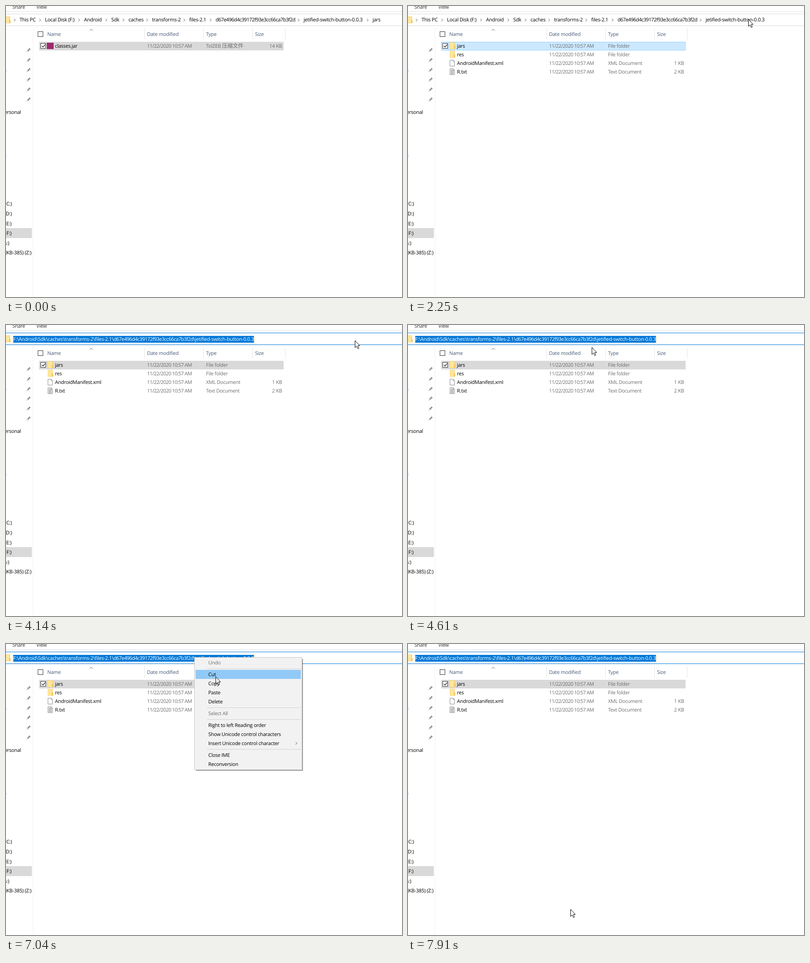
These frames come from a looping animation (873x642 px, 7.99 s). An HTML page:

```html
<!DOCTYPE html>
<html lang="en">
<head>
<meta charset="utf-8">
<title>File browser</title>
<style>
html, body { margin: 0; width: 100%; height: 100%; overflow: hidden; background: #fff; }
svg { display: block; width: 873px; height: 642px; }
text { font: 11px "Open Sans", "Noto Sans CJK SC", "Noto Sans CJK", sans-serif;
  letter-spacing: -.27px; text-rendering: geometricPrecision; white-space: pre; }
.num { letter-spacing: -.55px; }
.cjk { font-size: 12px; }
</style>
</head>
<body>
<svg id="stage" viewBox="0 0 873 642"></svg>
<script>
const stage = document.getElementById('stage');
const LOOP = 7990, START = 220, TICK = 78.4;
const GREY = '#6d6d6d', HEAD = '#465a78', BLUE = '#0078d7';
const OPEN_PARENT = 24, FOCUS = 48, BEAM = 59, BUSY = 77, MENU = 79, ARROW = 84, MENU_END = 92;

// cursor path: tick, x, y
const PATH = [
  [0, 850, 592], [1, 765, 380], [2, 699, 218], [3, 699, 218], [5, 692, 190], [8, 705, 130],
  [11, 741, 77], [14, 798, 55], [15, 798, 55], [20, 750, 29], [26, 750, 29], [33, 801, 34],
  [36, 420, 163], [38, 68, 140], [39, 76, 117], [41, 200, 75], [44, 760, 50], [46, 840, 30],
  [49, 840, 30], [55, 415, 52], [56, 405, 49], [58, 412, 50], [59, 417, 33], [77, 415, 29],
  [79, 415, 29], [82, 414, 38], [84, 422, 44], [87, 462, 72], [89, 465, 87], [92, 465, 87], [98, 358, 585]
];

const text = (x, y, s, fill = '#000', more = '') => `<text x="${x}" y="${y}" fill="${fill}" ${more}>${s}</text>`;
const rect = (x, y, w, h, fill, more = '') => `<rect x="${x}" y="${y}" width="${w}" height="${h}" fill="${fill}" ${more}/>`;
const path = (d, stroke, fill = 'none', more = '') => `<path d="${d}" stroke="${stroke}" fill="${fill}" ${more}/>`;
const frame = (x, y, w, h, fill, stroke, more = '') =>
  rect(x + .5, y + .5, w - 1, h - 1, fill, `stroke="${stroke}" ${more}`);
const chevron = (x, y) => path(`M${x - 1.5} ${y - 3}l3 3l-3 3`, '#555');
const num = s => `<tspan class="num">${s}</tspan>`;
const box = (x, y) => frame(x, y, 12, 12, '#fff', '#333');
const END = 'text-anchor="end"';

const HASH = num('d67e496d4c39172f93e3cc66ca7b3f2d');
const CRUMBS = [[30, 'This PC'], [86, 'Local Disk (F:)'], [172, 'Android'], [232, 'Sdk'], [270, 'caches'],
  [322, 'transforms-2'], [404, 'files-2.1'], [462, HASH], [656, 'jetified-switch-button-0.0.3'], [808, 'jars']];
const FULL = `F:\\Android\\Sdk\\caches\\transforms-2\\files-2.1\\${HASH}\\jetified-switch-button-0.0.3`;
const JAR_LIST = [['archive', 'classes.jar', 'TolZEB <tspan class="cjk">压缩文件</tspan>', '14 KB']];
const PARENT_LIST = [['folder', 'jars', 'File folder', ''], ['folder', 'res', 'File folder', ''],
  ['doc', 'AndroidManifest.xml', 'XML Document', '1 KB'], ['lines', 'R.txt', 'Text Document', '2 KB']];
const MENU_ITEMS = [[41, 'Undo', GREY], [67, 'Cut'], [87, 'Copy'], [107, 'Paste'], [127, 'Delete'],
  [153, 'Select All', GREY], [179, 'Right to left Reading order'], [199, 'Show Unicode control characters'],
  [219, 'Insert Unicode control character'], [245, 'Close IME'], [265, 'Reconversion']];
// right edge, middle, label; the labels run off the left side
const SIDE = [[33, 234, 'Personal'], [13, 436, 'C:)'], [13, 458, 'D:)'], [12, 480, 'E:)'], [12, 501, 'F:)'],
  [7, 523, 'G:)'], [56, 544, 'JKB-385) (Z:)']];

function cursorAt(n) {
  const i = PATH.findIndex(k => k[0] >= n);
  if (i < 0) return PATH[PATH.length - 1].slice(1);
  if (i === 0) return PATH[0].slice(1);
  const [a, ax, ay] = PATH[i - 1], [b, bx, by] = PATH[i], f = (n - a) / (b - a);
  return [Math.round(ax + (bx - ax) * f), Math.round(ay + (by - ay) * f)];
}

const folder = (x, y) => rect(x, y, 11, 15, '#fbd775') + rect(x + 1, y + 1, 8, 13, '#ffe69c') + rect(x + 9, y + 8, 3, 7, '#f3c85a');

function icon(kind, y) {
  if (kind === 'archive') return rect(90, y - 7, 15, 14, '#9c2a6b');
  if (kind === 'folder') return folder(92, y - 8);
  const page = path(`M92.5 ${y - 6.5}h7l3 3v10h-10z`, '#8c8c8c', '#fff') + path(`M99.5 ${y - 6.5}v3h3`, '#8c8c8c');
  return kind === 'doc' ? page : page + path([-3.5, -1.5, .5, 2.5, 4.5].map(d => `M94 ${y + d}h7`).join(''), '#888');
}

function sidebar() {
  const pin = y => path('M-2 -5h4v1.500h-.5v3.500l1.500 1.500h-2.500v4h-1v-4h-2.500l1.500 -1.500v-3.500h-.5z',
    'none', '#87939b', `transform="translate(49.500 ${y + .5}) rotate(45)"`);
  return rect(59, 48, 1, 592, '#f0f0f0') + rect(0, 490, 57, 22, '#d9d9d9') +
    [97, 119, 141, 162, 184, 206].map(pin).join('') +
    SIDE.map(([x, y, s]) => text(x, y + 4, s, '#000', END)).join('') +
    [141, 328].map(y => text(-4, y + 4, 's', '#2b8cd8')).join('');
}

function addressBar(n) {
  const focused = n >= FOCUS, edge = focused ? BLUE : '#d9d9d9';
  let out = text(14, 6, 'Share', '#333') + text(67, 6, 'View', '#333') + rect(0, 12, 873, 1, '#e2e2e2') +
    rect(0, 17, 873, 1, edge) + rect(0, 43, 873, 1, edge) + folder(-2, 23);
  if (focused) {
    out += rect(16, 24, 531, 15, BLUE) + text(16, 35, FULL, '#fff');
    if (n < 65 || n >= 72) out += rect(546, 24, 1, 14, '#ff8728');
    return out;
  }
  let glow = 0;
  if (n >= 18 && n < OPEN_PARENT || n >= 27 && n <= 34) glow = 1;
  else if (n > 34) glow = Math.max(0, (41 - n) / 6);
  if (glow) out += frame(653, 18, 152, 25, '#e5f3ff', '#cce8ff', `opacity="${glow}"`);
  const inJars = n < OPEN_PARENT;
  CRUMBS.forEach(([x, s], i) => {
    const last = i === CRUMBS.length - 1;
    if (!last || inJars || n >= 27) out += chevron(x - 11, 31);
    if (!last || inJars) out += text(x, 34, s);
  });
  return out;
}

function fileList(n, x, y) {
  const inJars = n < OPEN_PARENT, list = inJars ? JAR_LIST : PARENT_LIST;
  const menuOpen = n >= MENU && n < MENU_END;
  let out = n === 57 || n === 58 ? rect(306, 49, 130, 24, '#d9ebf9') : '';
  out += box(70, 56) + path('M184.500 54.500l3.500 -3.500l3.500 3.500', '#666') +
    [[91, 'Name'], [311, 'Date modified'], [441, 'Type'], [549, 'Size']].map(([cx, s]) => text(cx, 66, s, HEAD)).join('') +
    [305, 435, 543, 615].map(cx => rect(cx, 50, 1, 24, '#e5e5e5')).join('');
  list.forEach(([kind, name, type, size], i) => {
    const mid = 88 + i * 19;
    const over = n >= 0 && !menuOpen && x >= 73 && x < 612 && Math.floor((y - 79) / 19) === i;
    if (i === 0) {
      out += inJars || n >= FOCUS ? rect(73, 79, 539, 19, '#d9d9d9') : frame(73, 79, 539, 19, '#cce8ff', '#99d1ff');
      out += box(76, 82) + path('M79 88l2.500 2.500l5 -5.500', '#222', 'none', 'stroke-width="1.3"');
    } else if (over) {
      out += rect(73, mid - 9, 539, 19, '#e5f3ff') + box(76, mid - 6);
    }
    out += icon(kind, mid) + text(108, mid + 4, name) + text(311, mid + 4, num('11/22/2020 10:57 AM'), GREY) +
      text(441, mid + 4, type, GREY) + text(608.5, mid + 4, size, GREY, END);
  });
  return out;
}

function menu(n, y) {
  if (n < MENU || n >= MENU_END) return '';
  let out = rect(419, 33, 236, 247, '#000', 'opacity=".2"') + rect(419, 33, 235, 246, '#000', 'opacity=".35"') +
    frame(415, 29, 238, 249, '#f2f2f2', '#c4c4c4');
  if (n >= ARROW && y >= 57) out += rect(418, y < 77 ? 57 : 77, 232, 20, '#91c9f7');
  out += [54, 140, 166, 232].map(sy => rect(443, sy, 207, 1, '#d2d2d2')).join('') +
    MENU_ITEMS.map(([my, s, c]) => text(446, my + 4, s, c)).join('') + chevron(640, 219);
  return `<g opacity="${Math.min(1, (n - MENU + 1) / 4)}">${out}</g>`;
}

function pointer(n, x, y) {
  if (n < 0) return '';
  if (n >= BEAM && n < BUSY) {
    const top = n < 68 ? 26 : n < 74 ? 25 : 22;
    return path(`M414 ${top + .5}h2.500m1 0h2.500M417 ${top + 1}v13M414 ${top + 14.5}h2.500m1 0h2.500`, '#ff8728');
  }
  if (n >= BUSY && n < ARROW)
    return `<circle cx="${x}" cy="${y}" r="8.500" fill="none" stroke="#4bb4ee" stroke-width="4"/>`;
  return path('M.5 .5V16L4 12.700L6.500 18.300L9 17.200L6.600 11.700H11z', '#000', '#fff', `transform="translate(${x} ${y})"`);
}

let shown;
function draw() {
  const t = performance.now() % LOOP;
  const n = Math.floor((t - START) / TICK + .15);
  if (n !== shown) {
    shown = n;
    const [x, y] = cursorAt(n);
    stage.innerHTML = rect(0, 0, 873, 642, '#fff') + sidebar() + addressBar(n) + fileList(n, x, y) + menu(n, y) + pointer(n, x, y);
  }
  requestAnimationFrame(draw);
}
draw();
</script>
</body>
</html>
```
